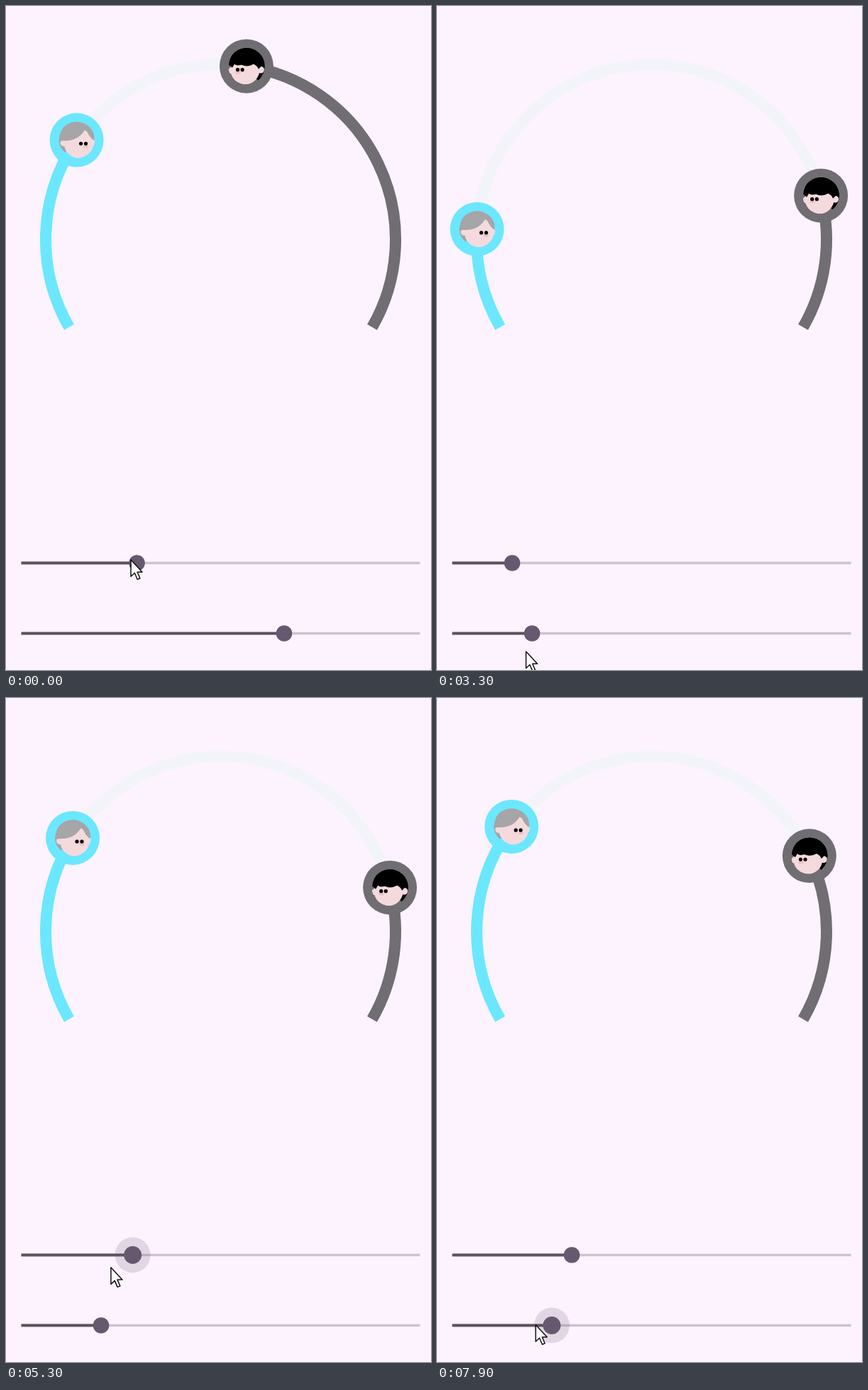
Write an HTML page that moves like this. It is 599x934 px and loops after 8 s.

```html
<!DOCTYPE html>
<html lang="en">
<head>
<meta charset="utf-8">
<title>Two-sided arc sliders</title>
<style>
  html, body { margin: 0; width: 100%; height: 100%; overflow: hidden; background: #fcf3fe; }
  svg { display: block; width: 100%; height: 100%; }
  .arc { fill: none; stroke-width: 16; }
  .rail { stroke: #cdc2d2; stroke-width: 3.6; }
  .fill { stroke: #5c525f; stroke-width: 3.8; }
  .thumb, .halo { fill: #65586f; }
  .halo { opacity: .18; }
  .skin { fill: #f5dadd; }
  .nose { fill: #eec3c6; }
  .grey { fill: #a6a5a8; }
</style>
</head>
<body>
<svg viewBox="0 0 599 934">
  <defs><clipPath id="disc"><circle r="25.7"/></clipPath></defs>

  <path class="arc" stroke="#f2f4f9" d="M89 451.8A246.5 246.5 0 1 1 516 451.8"/>
  <path class="arc" id="arcA" stroke="#6be7ff" pathLength="240" d="M89 451.8A246.5 246.5 0 1 1 516 451.8"/>
  <path class="arc" id="arcB" stroke="#706d73" pathLength="240" d="M516 451.8A246.5 246.5 0 1 0 89 451.8"/>

  <g id="avatarA">
    <circle r="38" fill="#6be7ff"/>
    <g clip-path="url(#disc)">
      <path class="grey" d="M-25 0A25.5 25.5 0 0 1 25 0L23 5L-17 17Q-25 10-25 0Z"/>
      <circle class="skin" cx="3" cy="5" r="20.5"/>
      <circle class="skin" cx="-18" cy="4" r="5"/>
      <circle class="skin" cx="22" cy="4" r="4.5"/>
      <path class="grey" d="M-25 2Q-24-26 2-26Q25-24 25-1L23 0Q16-6 13-17Q4 2-19 1Z"/>
      <ellipse class="nose" cx="13" cy="9" rx="4" ry="2"/>
      <circle cx="6" cy="5" r="2.6"/><circle cx="12.9" cy="5" r="2.6"/>
    </g>
  </g>

  <g id="avatarB">
    <circle r="38" fill="#706d73"/>
    <g clip-path="url(#disc)">
      <path d="M-24-3Q-22-26 2-26Q26-24 26 2Q26 14 18 22L0 0Z"/>
      <circle class="skin" cx="-2" cy="5" r="20.5"/>
      <circle class="skin" cx="-21" cy="6" r="4.5"/>
      <circle class="skin" cx="20" cy="5" r="5"/>
      <path d="M-25-2Q-22-26 2-26Q26-24 26 2L21 0L17 4Q15-1 10-3Q1 2-7-2Q-14 0-17-3L-20 2Z"/>
      <ellipse class="nose" cx="-12" cy="9" rx="4" ry="2"/>
      <circle cx="-12.4" cy="5" r="2.6"/><circle cx="-5.8" cy="5" r="2.6"/>
    </g>
  </g>

  <g id="sliderA" transform="translate(0 783.5)">
    <path class="rail" d="M21.5 0H583.5"/><path class="fill"/>
    <circle class="halo"/><circle class="thumb"/>
  </g>
  <g id="sliderB" transform="translate(0 882.5)">
    <path class="rail" d="M21.5 0H583.5"/><path class="fill"/>
    <circle class="halo"/><circle class="thumb"/>
  </g>

  <path id="cursor" fill="#fff" stroke="#111" stroke-width="1.5" stroke-linejoin="round"
        d="M.5 0V23.5L5.8 18.5L9.7 27.5L13.4 26L9.6 17.2H16.5Z"/>
</svg>
<script>
const LOOP = 8000, STEP = 100;
const CENTER = { x: 302.5, y: 328.5 }, RADIUS = 246.5;
const RAIL_START = 22, RAIL_LENGTH = 561, SWEEP = 223;
const GRIP = 9, LEAD = 45, FADE = 150, GLIDE = 300;

// Turning points of each thumb as [time, x]; it eases from one to the next.
const turns = {
  A: [[100, 184.5], [450, 104], [780, 312], [1350, 106], [3950, 106], [4150, 95],
    [4400, 95], [4950, 312], [5540, 103], [5980, 284], [6830, 190]],
  B: [[1900, 392], [3035, 134], [7000, 134], [7480, 312], [8040, 134]],
};

// The pointer holds one thumb from press to release while drifting from y0 to y1.
const drags = [
  { side: "A", press: 100, release: 1350, y0: 779, y1: 787 },
  { side: "B", press: 1900, release: 3035, y0: 867, y1: 908 },
  { side: "A", press: 3950, release: 6830, y0: 795, y1: 808 },
  { side: "B", press: 7000, release: 8040, y0: 893, y1: 880 },
];

const $ = id => document.getElementById(id);
const clamp = v => Math.max(0, Math.min(1, v));
const mix = (a, b, u) => a + (b - a) * u;
const smooth = u => u * u * (3 - 2 * u);

function thumbX(side, t) {
  const points = turns[side];
  const next = points.findIndex(([time]) => time > t);
  if (next === 0) return points[0][1];
  if (next < 0) return points.at(-1)[1];
  const [t0, x0] = points[next - 1], [t1, x1] = points[next];
  return mix(x0, x1, smooth((t - t0) / (t1 - t0)));
}

function pressAmount(side, t) {
  return Math.max(...drags.filter(drag => drag.side === side).map(({ press, release }) =>
    clamp((t - press) / FADE) * clamp((release + FADE - t) / FADE)));
}

function gripPoint({ side, press, release, y0, y1 }, t) {
  const held = Math.max(press, Math.min(release, t));
  return {
    x: thumbX(side, Math.min(held + (t > press ? LEAD : 0), release)) - GRIP,
    y: mix(y0, y1, (held - press) / (release - press)),
  };
}

function pointerAt(t) {
  const current = drags.findLastIndex(drag => drag.press <= t);
  if (current < 0) return gripPoint(drags[0], t);
  const from = gripPoint(drags[current], t), next = drags[current + 1];
  if (!next) return from;
  const glide = Math.min(GLIDE, next.press - drags[current].release);
  const u = smooth(clamp((t - next.press + glide) / glide));
  const to = gripPoint(next, t);
  return { x: mix(from.x, to.x, u), y: mix(from.y, to.y, u) };
}

function drawSide(side, direction, t) {
  const x = thumbX(side, t), press = pressAmount(side, t);
  const slider = $("slider" + side);
  slider.querySelector(".fill").setAttribute("d", `M21.5 0H${x}`);
  for (const [part, r] of [["halo", 25 * press], ["thumb", 11.3 + 1.2 * press]]) {
    const circle = slider.querySelector("." + part);
    circle.setAttribute("cx", x);
    circle.setAttribute("r", r);
  }
  // Each side may cover at most half of the sweep.
  const degrees = Math.min((x - RAIL_START) / RAIL_LENGTH, .5) * SWEEP;
  const angle = (degrees - 30) * Math.PI / 180;
  const ax = CENTER.x + direction * RADIUS * Math.cos(angle);
  const ay = CENTER.y - RADIUS * Math.sin(angle);
  $("arc" + side).setAttribute("stroke-dasharray", `${degrees} 400`);
  $("avatar" + side).setAttribute("transform", `translate(${ax} ${ay})`);
}

function draw(elapsed) {
  const t = Math.floor(elapsed % LOOP / STEP) * STEP;
  drawSide("A", -1, t);
  drawSide("B", 1, t);
  const { x, y } = pointerAt(t);
  $("cursor").setAttribute("transform", `translate(${x} ${y})`);
}

const start = performance.now();
function tick() {
  draw(performance.now() - start);
  requestAnimationFrame(tick);
}
tick();
</script>
</body>
</html>
```
